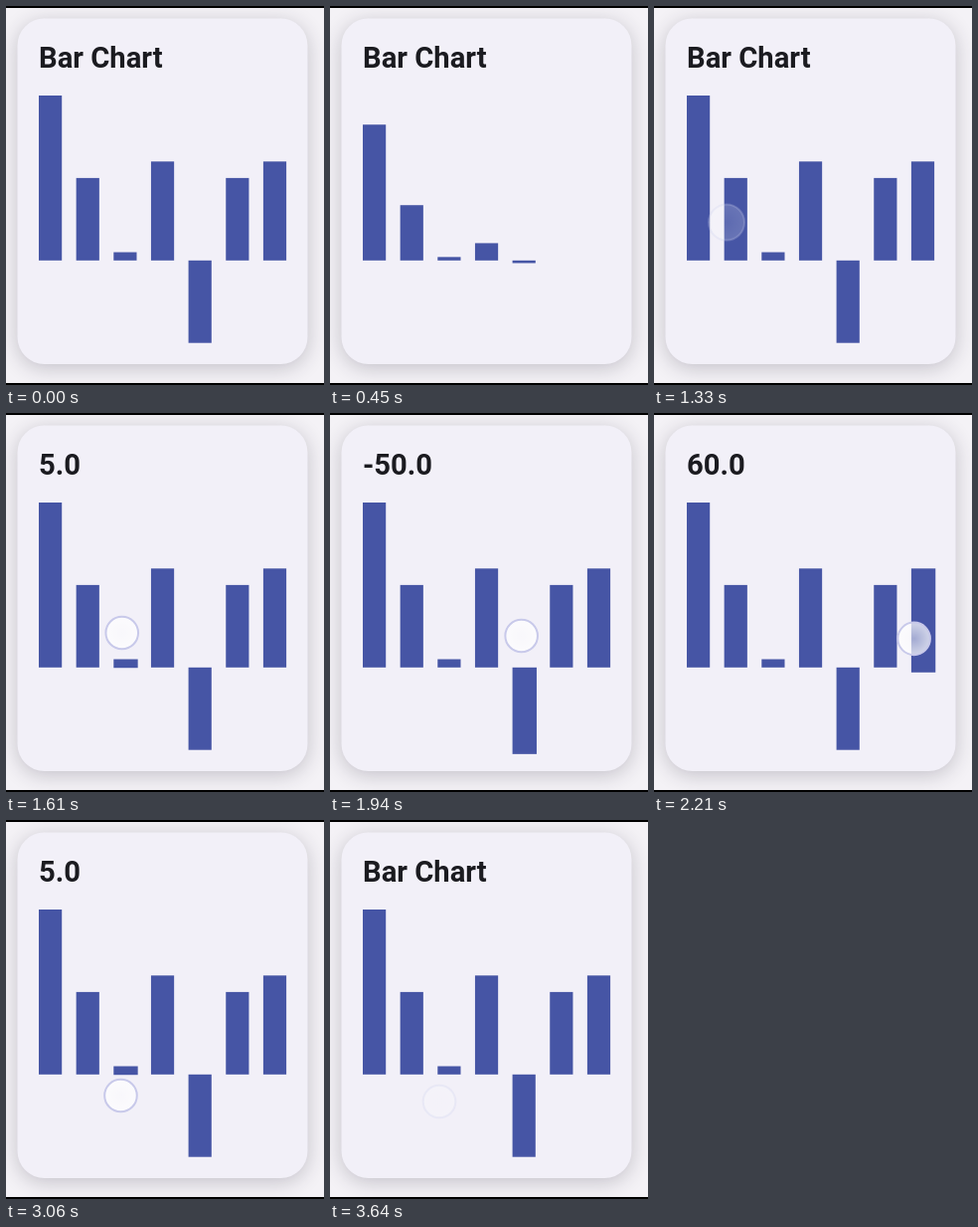
Recreate the animation shown at these times as an HTML page with a canvas. Size 320 by 381 pixels, loop 3730 ms.

```html
<!DOCTYPE html>
<html lang="en">
<head>
<meta charset="utf-8">
<title>Bar Chart</title>
<style>
  html, body { margin: 0; width: 100%; height: 100%; overflow: hidden; background: #f4f2f6; }
  canvas { display: block; width: 320px; height: 381px; }
</style>
</head>
<body>
<canvas id="stage"></canvas>
<script>
const W = 320, H = 381, LOOP = 3730;
const canvas = document.getElementById('stage');
const ctx = canvas.getContext('2d');
const dpr = window.devicePixelRatio || 1;
canvas.width = W * dpr;
canvas.height = H * dpr;

const values = [100, 50, 5, 60, -50, 50, 60];
const chart = { left: 33, pitch: 37.65, width: 23.2, base: 255.8, unit: 1.658, zoom: 1.05 };
const grow = { start: 180, duration: 500, delays: [0, 56, 112, 160, 216, 292, 336] };

// time, x, y of the touch point
const path = [
  [1480, 73, 217.5], [1610, 116.5, 221], [1750, 150, 222], [1880, 184, 223.5],
  [1940, 192, 224], [2000, 232, 225], [2120, 256, 226], [2330, 269, 228],
  [2520, 269, 228], [2580, 257, 229.5], [2640, 234, 232], [2800, 186, 247],
  [2960, 136, 266], [3060, 115.5, 277], [3300, 110, 283]
];
// time, selected bar
const picks = [
  [1495, 1], [1580, 2], [1700, 3], [1885, 4], [1990, 5], [2090, 6],
  [2670, 5], [2770, 4], [2890, 3], [3000, 2], [3520, -1]
];

const clamp = v => Math.min(1, Math.max(0, v));
const lerp = (a, b, k) => a + (b - a) * k;

// cubic-bezier(.4, 0, .2, 1)
function ease(x) {
  if (x <= 0 || x >= 1) return clamp(x);
  let lo = 0, hi = 1;
  for (let i = 0; i < 24; i++) {
    const s = (lo + hi) / 2, r = 1 - s;
    if (1.2 * r * r * s + 0.6 * r * s * s + s * s * s < x) lo = s; else hi = s;
  }
  return lo * lo * (3 - 2 * lo);
}

function touchAt(t) {
  const n = path.findIndex(p => p[0] > t);
  if (n === 0) return path[0].slice(1);
  if (n < 0) return path[path.length - 1].slice(1);
  const a = path[n - 1], b = path[n], k = (t - a[0]) / (b[0] - a[0]);
  return [lerp(a[1], b[1], k), lerp(a[2], b[2], k)];
}

function pickAt(t) {
  let bar = -1;
  for (const [time, index] of picks) if (t >= time) bar = index;
  return bar;
}

function drawCard() {
  ctx.fillStyle = '#f4f2f6';
  ctx.fillRect(0, 0, W, H);
  ctx.save();
  ctx.shadowColor = 'rgba(40, 36, 60, 0.24)';
  ctx.shadowBlur = 20 * dpr;
  ctx.shadowOffsetY = 4 * dpr;
  ctx.fillStyle = '#f2f0f8';
  ctx.beginPath();
  ctx.roundRect(11.5, 12.5, 292, 347.5, 27);
  ctx.fill();
  ctx.restore();
  ctx.fillStyle = '#000';
  ctx.fillRect(0, 0, W, 2);
  ctx.fillRect(0, 379, W, 2);
}

function drawTitle(bar) {
  ctx.font = '700 29.2px Roboto, sans-serif';
  ctx.fillStyle = '#1b1b20';
  ctx.fillText(bar < 0 ? 'Bar Chart' : values[bar].toFixed(1), 33, 61.5);
}

function drawBars(t, picked) {
  ctx.fillStyle = '#4655a5';
  values.forEach((value, i) => {
    const k = t < grow.start ? 1 : ease((t - grow.start - grow.delays[i]) / grow.duration);
    const size = Math.abs(value) * chart.unit * k;
    const top = value > 0 ? chart.base - size : chart.base;
    const zoom = i === picked ? chart.zoom : 1;
    ctx.fillRect(chart.left + i * chart.pitch, top, chart.width * zoom, size * zoom);
  });
}

function drawTouch(t) {
  if (t < 1330) return;
  const press = clamp((t - 1470) / 60);
  const alpha = lerp(0.25, 1, press) * lerp(1, 0.25, clamp((t - 3520) / 120));
  const r = lerp(18, 16.3, press);
  const [x, y] = touchAt(t);
  ctx.save();
  ctx.globalAlpha = alpha;
  const fill = ctx.createRadialGradient(x, y, 0, x, y, r);
  fill.addColorStop(0, 'rgba(255, 255, 255, 0.5)');
  fill.addColorStop(1, 'rgba(255, 255, 255, 0.75)');
  ctx.fillStyle = fill;
  ctx.beginPath();
  ctx.arc(x, y, r, 0, Math.PI * 2);
  ctx.fill();
  ctx.strokeStyle = '#c8c9ea';
  ctx.lineWidth = 2;
  ctx.stroke();
  ctx.restore();
}

function draw(t) {
  const picked = pickAt(t);
  ctx.setTransform(dpr, 0, 0, dpr, 0, 0);
  drawCard();
  drawTitle(picked);
  drawBars(t, picked);
  drawTouch(t);
}

const begin = performance.now();
function tick() {
  draw((performance.now() - begin) % LOOP);
  requestAnimationFrame(tick);
}
tick();
</script>
</body>
</html>
```
